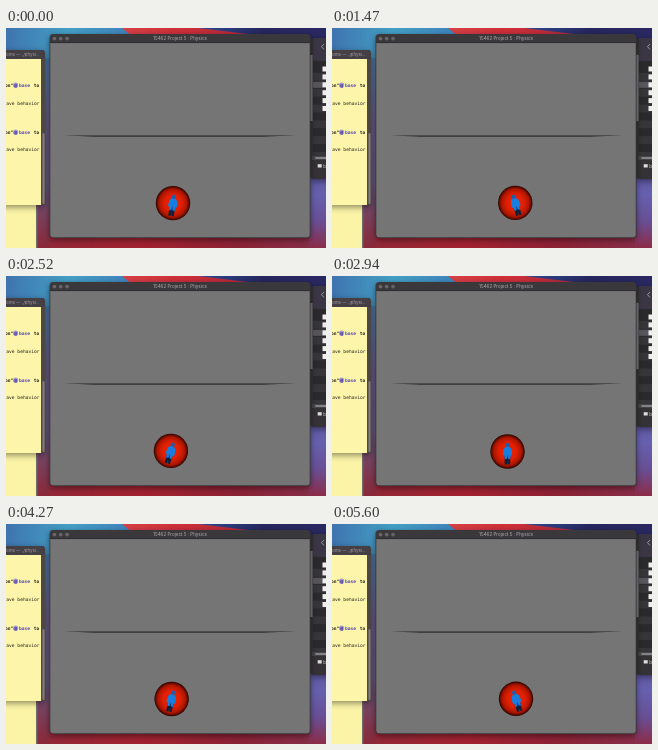
An HTML page with a canvas for the animation above (5670 ms loop, 320 by 220 pixels).

```html
<!DOCTYPE html>
<html lang="en">
<head>
<meta charset="utf-8">
<title>Physics</title>
<style>
html, body { margin: 0; width: 100%; height: 100%; overflow: hidden; background: #757575; }
canvas { display: block; width: 320px; height: 220px; }
</style>
</head>
<body>
<canvas id="stage" width="320" height="220"></canvas>
<script>
const ctx = document.getElementById('stage').getContext('2d');
const LOOP = 5670, STEP = 70, SWING = 2100;
const MONO = '"DejaVu Sans Mono", monospace';
const SANS = 'Inter, sans-serif';

function rect(x, y, w, h, fill) {
  ctx.fillStyle = fill;
  ctx.fillRect(x, y, w, h);
}

function panel(x, y, w, h, radius, fill) {
  ctx.beginPath();
  ctx.roundRect(x, y, w, h, radius);
  ctx.fillStyle = fill;
  ctx.fill();
}

function disc(x, y, r, fill) {
  ctx.beginPath();
  ctx.arc(x, y, r, 0, Math.PI * 2);
  ctx.fillStyle = fill;
  ctx.fill();
}

function shape(points, fill) {
  ctx.beginPath();
  points.forEach(([x, y]) => ctx.lineTo(x, y));
  ctx.closePath();
  ctx.fillStyle = fill;
  ctx.fill();
}

function label(text, x, y, font, fill, align = 'left') {
  ctx.font = font;
  ctx.textAlign = align;
  ctx.fillStyle = fill;
  ctx.fillText(text, x, y);
}

function blend(x0, y0, x1, y1, ...colors) {
  const g = ctx.createLinearGradient(x0, y0, x1, y1);
  colors.forEach((c, i) => g.addColorStop(i / (colors.length - 1), c));
  return g;
}

function withShadow(draw) {
  ctx.save();
  ctx.shadowColor = 'rgba(0,0,0,.45)';
  ctx.shadowBlur = 6;
  ctx.shadowOffsetY = 2;
  draw();
  ctx.restore();
}

function wallpaper() {
  rect(0, 0, 320, 220, blend(100, 0, 240, 0, '#d8474a', '#cf2f38', '#b52a3c'));
  shape([[0, 0], [116, 0], [126, 8], [60, 60], [0, 60]],
    blend(0, 0, 124, 0, '#3f74ae', '#43a0c6', '#3f83bd'));
  shape([[192, 0], [320, 0], [320, 30], [300, 14], [250, 7]],
    blend(192, 0, 320, 0, '#2f4a94', '#27275f', '#2a2862'));
  rect(30, 30, 16, 190, blend(0, 30, 0, 220, '#4a78a8', '#6a5a88', '#67577f', '#8a2838'));
  rect(44, 200, 276, 20, blend(44, 0, 320, 0, '#932838', '#a3222f', '#8c2235', '#87304c'));
  rect(303, 110, 17, 110, blend(0, 140, 0, 220, '#5a55a0', '#6660ae', '#684f95', '#8c2c48'));
}

function codeWindow() {
  rect(0, 170, 30, 50, '#fbf3a6');
  rect(30, 178, 1.5, 42, '#6f6a68');
  withShadow(() => panel(-10, 22, 49, 155, 3, '#48423f'));
  rect(0, 22, 38, 9, '#454045');
  label('ome — ./physi…', 0, 28, '4.4px ' + SANS, '#a59d9d');
  rect(0, 31, 35, 146, '#fdf5a9');
  rect(35, 31, 4, 146, '#4c4946');
  panel(36.5, 105, 2, 71, 1, '#85827f');

  const font = 'bold 4.6px ' + MONO;
  for (const y of [59, 106]) {
    label('on"', -1, y, font, '#222');
    disc(9.6, y - 1.8, 2.6, '#a99ad0');
    label('@', 8.2, y - .3, font, '#31249a');
    label('base', 13, y, font, '#5845b8');
    label('to', 27.7, y, font, '#222');
  }
  for (const y of [76.5, 123]) label('ave behavior', .3, y, '4.6px ' + MONO, '#222');
}

function fileWindow() {
  withShadow(() => panel(304, 10, 30, 141, 4, '#343235'));
  rect(307, 10, 13, 23, '#3a3644');
  rect(304, 27, 2.5, 66, '#77757a');
  ctx.strokeStyle = '#b5b0b8';
  ctx.lineWidth = .8;
  ctx.beginPath();
  ctx.moveTo(318, 16);
  ctx.lineTo(315.5, 18.7);
  ctx.lineTo(318, 21.4);
  ctx.stroke();
  rect(307, 33, 13, 95, '#2a292b');
  for (let i = 0; i < 12; i++) {
    const y = 37 + i * 7.9;
    if (i % 2) rect(307, y, 13, 7.9, '#363538');
    if (i === 2) rect(307, y + 1, 13, 6, '#58565a');
    if (i < 6) rect(316.5, y + 1.5, 3.5, 5, '#eee');
  }
  rect(306, 128, 14, 4, '#464447');
  panel(309, 129, 14, 2, 1, '#858388');
  rect(311.7, 136.2, 4, 3.3, '#ddd');
  label('b', 317.3, 139.5, '4.5px ' + SANS, '#ccc');
}

function mainWindow() {
  withShadow(() => panel(43.5, 6, 261, 204, 4, '#3a383b'));
  panel(44.3, 15, 259.4, 194.2, [0, 0, 3, 3], '#757575');
  rect(44.3, 14.3, 259.4, .8, '#2b2a2c');
  for (const x of [48.5, 54.7, 61]) disc(x, 10.6, 1.9, '#67656a');
  label('15462 Project 5 : Physics', 174, 12.2, '500 4.5px ' + SANS, '#a19fa3', 'center');
  shape([[58, 107], [290, 107], [276, 108], [72, 108]], '#4c4c4c');
  shape([[72, 108], [274, 108], [258, 108.7], [88, 108.7]], '#303030');
}

function figure() {
  shape([[-3, 2], [3, 2], [2.7, 13], [.5, 13], [0, 10], [-.5, 13], [-2.7, 13]], '#10203c');
  shape([[-1.6, -5], [1.6, -5], [4, -2.5], [4.6, 3.5], [3.2, 4], [2.6, 8],
    [.5, 7], [0, 3], [-.5, 7], [-2.6, 8], [-3.2, 4], [-4.6, 3.5], [-4, -2.5]], '#197de0');
  disc(0, -6.5, 2.1, '#1c5fae');
}

function ball(time) {
  const wave = lag => -Math.cos((time - lag) / SWING * Math.PI * 2);
  const sway = 10.2 * wave(268);
  ctx.save();
  ctx.translate(174.1 + sway, 175.5 - .007 * sway * sway);
  const glow = ctx.createRadialGradient(0, 0, 0, 0, 0, 17.2);
  glow.addColorStop(0, '#ee2300');
  glow.addColorStop(.5, '#e02000');
  glow.addColorStop(.8, '#ae1600');
  glow.addColorStop(.93, '#620a00');
  glow.addColorStop(1, '#1c0400');
  disc(0, 0, 17.2, glow);
  ctx.rotate(-wave(330) * 17 * Math.PI / 180);
  figure();
  ctx.restore();
}

const start = performance.now();

function frame() {
  const elapsed = Math.max(0, performance.now() - start);
  wallpaper();
  codeWindow();
  fileWindow();
  mainWindow();
  ball(Math.floor(elapsed % LOOP / STEP) * STEP);
  requestAnimationFrame(frame);
}

frame();
</script>
</body>
</html>
```
